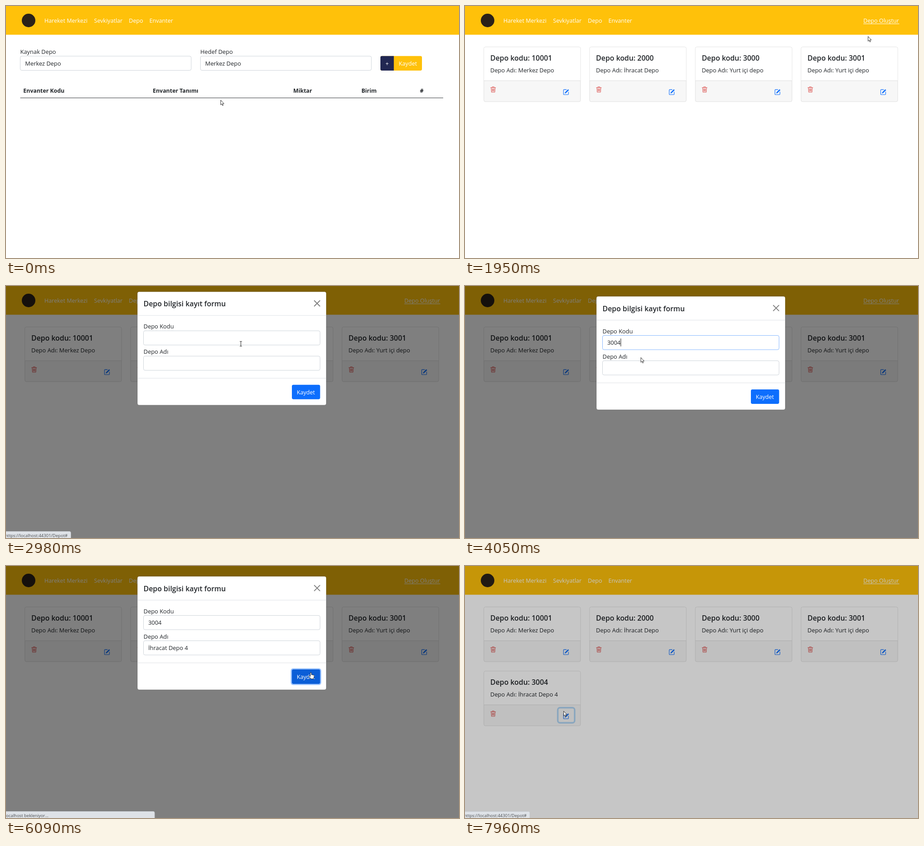
Animation, 1003 px wide and 558 px high, one loop 8000 ms. Source, as an HTML page:

```html
<!DOCTYPE html>
<html lang="tr">
<head>
<meta charset="utf-8">
<title>Depo</title>
<style>
html, body { margin: 0; width: 100%; height: 100%; overflow: hidden; background: #fff; }
svg { display: block; width: 100%; height: 100%; }
text { font: 12.9px "Open Sans", "Noto Sans", sans-serif; fill: #212529; white-space: pre; }
.w { font-size: 12.6px; fill: #fff; }
.b { font-size: 12.4px; font-weight: 700; }
.h { font-size: 15.9px; font-weight: 600; }
.s { font-size: 9.5px; fill: #4a4d51; }
.box { fill: #fff; stroke: #ced4da; }
.focus { stroke: #86b7fe; }
.ico { fill: none; stroke-width: 1.1; stroke-linejoin: round; }
</style>
</head>
<body>
<svg id="stage" viewBox="0 0 1003 558" xmlns="http://www.w3.org/2000/svg"></svg>
<script>
const LOOP = 8000, LAST = 7960;
const OPEN = 2660, TAB = 4450, SAVE = 6010, RELOAD = 6230, EDIT = 7893;
const stage = document.getElementById('stage');

const text = (x, y, s, cls = '') => `<text x="${x}" y="${y}" class="${cls}">${s}</text>`;
const rect = (x, y, w, h, attrs) => `<rect x="${x}" y="${y}" width="${w}" height="${h}" ${attrs}/>`;
const field = (x, y, w, id = '') => rect(x, y, w, 31.5, `rx="3.4" class="box" id="${id}"`);
const group = (id, body) => `<g id="${id}">${body}</g>`;

const trash = (x, y) => `<path class="ico" stroke="#d8433f" transform="translate(${x} ${y}) scale(.84)"
  d="M1 3.2H15M5.5 3V1.2H10.5V3M2.8 3.5L3.6 15.3H12.4L13.2 3.5M5.6 5.6L5.9 13M8 5.6V13M10.4 5.6L10.1 13"/>`;
const edit = (x, y) => `<g class="ico" stroke="#0d6efd" transform="translate(${x} ${y}) scale(.84)">
  <path stroke-width="1.3" d="M9.5 1.6H2.5a1.2 1.2 0 0 0-1.2 1.2V13.6a1.2 1.2 0 0 0 1.2 1.2H13.2a1.2 1.2 0 0 0 1.2-1.2V7"/>
  <path fill="#0d6efd" stroke-width=".7" d="M5 11.2L5.8 8.5L13.3 1L15.3 3L7.8 10.5Z"/></g>`;

function card([code, name], i) {
  const body = rect(0, 0, 214, 121, 'rx="3.4" fill="#f7f7f7" stroke="#dfdfdf"') +
    '<path fill="#fff" d="M.5 74.2V3.4a2.9 2.9 0 0 1 2.9-2.9H210.6a2.9 2.9 0 0 1 2.9 2.9V74.2Z"/>' +
    '<path stroke="#dfdfdf" d="M0 74.7H214"/>' +
    text(14.2, 30.2, 'Depo kodu: ' + code, 'h') + text(14.2, 56.2, 'Depo Adı: ' + name) +
    trash(13.8, 87.2) + edit(175.2, 93);
  return `<g id="card${i}" transform="translate(${41.8 + i % 4 * 234.1} ${90.8 + (i >> 2) * 142})">${body}</g>`;
}

const nav = rect(0, 0, 1003, 63.6, 'fill="#ffc10a"') +
  '<circle cx="50" cy="32" r="15" fill="#2b2118"/>' +
  text(85, 37, 'Hareket Merkezi', 'w') + text(195, 37, 'Sevkiyatlar', 'w') +
  text(272, 37, 'Depo', 'w') + text(317.5, 37, 'Envanter', 'w');

const moves = text(31.5, 106, 'Kaynak Depo') + text(430.3, 106, 'Hedef Depo') +
  field(31.5, 111, 378.5) + field(430.5, 111, 378.5) +
  text(42.3, 132, 'Merkez Depo') + text(441, 132, 'Merkez Depo') +
  rect(829, 110.7, 92, 32.3, 'rx="3.4" fill="#ffc10a"') +
  '<path fill="#212752" d="M858.7 110.7V143H832.4a3.4 3.4 0 0 1-3.4-3.4V114.1a3.4 3.4 0 0 1 3.4-3.4Z"/>' +
  text(840.3, 132, '+', 'w') + text(869.6, 132, 'Kaydet', 'w') +
  text(38.3, 191.7, 'Envanter Kodu', 'b') + text(325, 191.7, 'Envanter Tanımı', 'b') +
  text(636, 191.7, 'Miktar', 'b') + text(787, 191.7, 'Birim', 'b') + text(916.5, 191.7, '#', 'b') +
  '<path stroke="#34383c" d="M31.5 203.5H968"/>';

const depots = text(882, 37, 'Depo Oluştur', 'w') + '<path stroke="#fff" d="M882 39.5H961.5"/>' +
  [['10001', 'Merkez Depo'], ['2000', 'İhracat Depo'], ['3000', 'Yurt içi depo'],
    ['3001', 'Yurt içi depo'], ['3004', 'İhracat Depo 4']].map(card).join('') +
  rect(205.4, 313.7, 37.4, 33.6, 'id="ring" rx="5" fill="none" stroke="#b0d5f5" stroke-width="3.4"');

const modal = rect(291, 23, 418, 251, 'rx="4" fill="#fff" stroke="#000" stroke-opacity=".2"') +
  text(304.5, 55.5, 'Depo bilgisi kayıt formu', 'h') +
  '<path stroke="#7f7f7f" stroke-width="1.9" stroke-linecap="round" d="M682.8 42.8l12 12m0-12l-12 12"/>' +
  '<path stroke="#dee2e6" d="M291.5 75.5H708.5M291.5 214.5H708.5"/>' +
  text(304.5, 104.7, 'Depo Kodu') + text(304.5, 160.5, 'Depo Adı') +
  field(304.5, 109.5, 390.8, 'codeBox') + field(304.5, 165.5, 390.8, 'nameBox') +
  '<text id="code" x="315" y="130"></text><text id="name" x="315" y="186.3"></text>' +
  '<path id="caret" stroke="#111" d="M0 0V17.5"/>' +
  rect(630.4, 226.5, 67.6, 37, 'id="glow" rx="5.5" fill="#98c1fe"') +
  rect(633, 229, 62.5, 32, 'id="save" rx="3.4"') + text(643.7, 250, 'Kaydet', 'w');

const cursors = {
  arrow: '<path fill="#fff" stroke="#111" stroke-width=".85" d="M.4 .4V11L2.8 8.7L4.4 12.6L6 11.9L4.4 8.2H7.7Z"/>',
  hand: `<path fill="#fff" stroke="#111" stroke-width=".8" stroke-linejoin="round"
    d="M-1.2 9V1.2a1.2 1.2 0 0 1 2.4 0V5.2a1.1 1.1 0 0 1 2.1 .3a1.1 1.1 0 0 1 2 .4a1 1 0 0 1 1.8 .6V9.5L5.8 14H.2L-4 8.6a1.1 1.1 0 0 1 1.5-1.4Z"/>`,
  beam: '<path fill="none" stroke="#333" stroke-width="1.1" d="M-2.5-5.2H2.5M0-5V5M-2.5 5.2H2.5"/>'
};

stage.innerHTML = rect(0, 0, 1003, 558, 'fill="#fff"') + nav +
  group('moves', moves) + group('depots', depots) +
  rect(0, 0, 1003, 558, 'id="dim"') + group('modal', modal) +
  group('status', '<path id="bar" fill="#dee2e7" stroke="#c3c7cc"/><text id="note" class="s" x="-2.3" y="556"></text>') +
  group('cursor', Object.keys(cursors).map(k => group(k, cursors[k])).join(''));

const $ = id => document.getElementById(id);
const set = (id, k, v) => $(id).setAttribute(k, v);
const show = (id, on) => set(id, 'visibility', on ? 'inherit' : 'hidden');
const part = (t, from, span) => Math.min(1, Math.max(0, (t - from) / span));
const typed = (s, t, from, span) => s.slice(0, Math.floor(s.length * part(t, from, span)));

// Pointer stops: arrival time, x, y
const stops = [[70, 475, 208], [790, 286, 27], [1110, 286, 27], [1950, 892, 67], [2200, 918, 27],
  [OPEN, 918, 27], [2980, 520, 128], [3250, 430, 125], [3760, 430, 125], [4050, 389, 158],
  [4300, 480, 351], [5150, 834, 281], [SAVE, 675, 236], [6490, 674.5, 234.5], [7270, 218, 321]];

function pointer(t) {
  let [x, y] = stops[0].slice(1), before = 0;
  for (const [at, nx, ny] of stops) {
    const p = part(t, before, at - before), k = p * p * (3 - 2 * p);
    x += (nx - x) * k;
    y += (ny - y) * k;
    before = at;
  }
  return [x, y];
}

function look(t, x, y) {
  const inside = (l, top, r, b) => x > l && x < r && y > top && y < b;
  if (t >= OPEN && t < RELOAD) {
    if (inside(304, 99, 696, 141)) return 'beam';
    return inside(633, 229, 696, 261) ? 'hand' : 'arrow';
  }
  const link = inside(272, 15, 304, 45) && t < 1110 || inside(882, 15, 962, 45) ||
    inside(206, 315, 242, 347) && t < EDIT;
  return link ? 'hand' : 'arrow';
}

function status(t) {
  const during = (a, b) => t >= a && t < b;
  const url = 'https://localhost:44301/Depot';
  if (during(940, 1330) || during(6085, 6560)) return ['localhost bekleniyor...', 329];
  if (during(720, 940)) return [url, 137];
  return during(2200, 3050) || t > 7260 ? [url + '#', 143.5] : ['', 0];
}

function draw(t) {
  const open = t < RELOAD;
  show('moves', t < 1110);
  show('depots', t >= 1110);
  show('card4', t >= 1110 && !open);
  show('ring', t >= 7790);

  set('dim', 'opacity', .5 * part(t, open ? OPEN : EDIT, 150));
  const shown = OPEN + 152;
  show('modal', open && t > shown);
  set('modal', 'opacity', part(t, shown, 150));
  set('modal', 'transform', `translate(0 ${-42 * (1 - part(t, shown, 300)) ** 1.7})`);

  const focus = t < 3350 || t >= SAVE ? '' : t < TAB ? 'code' : 'name';
  $('code').textContent = typed('3004', t, 3450, 520);
  $('name').textContent = typed('İhracat Depo 4', t, TAB + 100, 1150);
  for (const id of ['code', 'name']) $(id + 'Box').classList.toggle('focus', focus === id);
  show('caret', focus);
  if (focus) {
    const x = 315.5 + $(focus).getComputedTextLength();
    set('caret', 'transform', `translate(${x} ${focus === 'code' ? 116.3 : 172.5})`);
  }
  show('glow', t >= SAVE);

  const [note, w] = status(t);
  show('status', note);
  $('note').textContent = note;
  set('bar', 'd', `M-2 543.5H${w - 3}a3 3 0 0 1 3 3V560H-2Z`);

  const [x, y] = pointer(t), kind = look(t, x, y);
  for (const k in cursors) show(k, k === kind);
  set('cursor', 'transform', `translate(${x} ${y})`);
  set('save', 'fill', kind === 'hand' ? '#0b5ed7' : '#0d6efd');
}

const begin = performance.now();
function tick() {
  draw(Math.min(LAST, (performance.now() - begin) % LOOP));
  requestAnimationFrame(tick);
}
tick();
</script>
</body>
</html>
```
